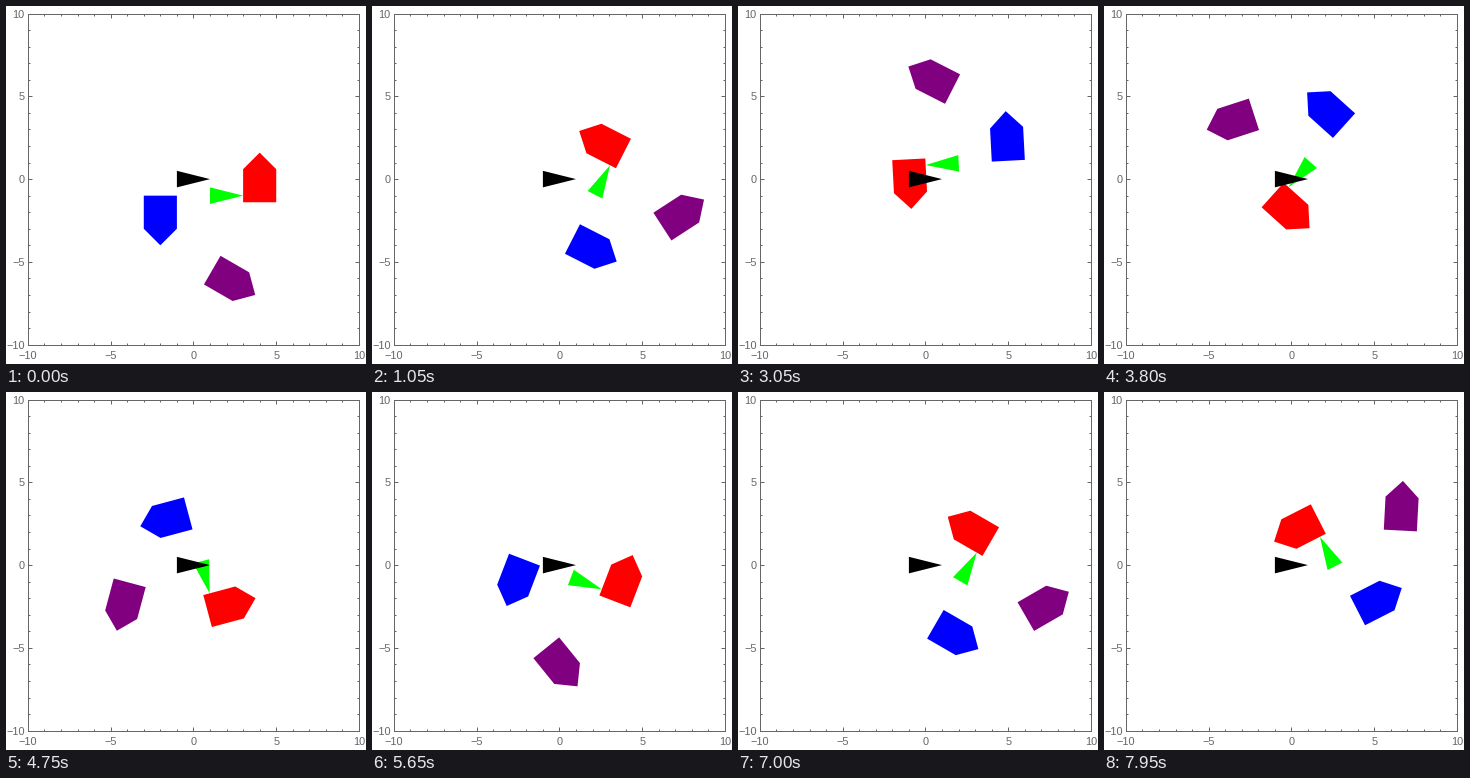
Animation of 360 by 358 pixels, one loop 8 s. Source, as a matplotlib script:

```python
import matplotlib.pyplot as plt
import numpy as np
from matplotlib.animation import FuncAnimation
from matplotlib.patches import Polygon
from matplotlib.ticker import MultipleLocator

W, H, DPI = 360, 358, 64
PX = 72 / DPI  # points per pixel
FRAMES, INTERVAL = 160, 50
STEP = 3  # degrees per frame
PIVOT = np.array([1.53, -0.037])
GRAY = "#666666"

plt.rcParams["font.family"] = "Liberation Sans"

# Both outlines point along +x
HOUSE = np.array([(-1, -1), (1, -1), (2, 0), (1, 1), (-1, 1)])
DART = np.array([(-1, -0.5), (1, 0), (-1, 0.5)])


def rotate(points, degrees):
    a = np.radians(degrees)
    c, s = np.cos(a), np.sin(a)
    return points @ np.array([(c, s), (-s, c)])


def place(outline, center, heading):
    return rotate(outline, heading) + center


MOVERS = [
    ("#ff0000", place(HOUSE, (4, -0.4), 90)),
    ("#0000ff", place(HOUSE, (-2, -2), -90)),
    ("#800080", place(HOUSE, (2, -6), -30)),
    ("#00ff00", place(DART, (2, -1), 0)),
]

fig = plt.figure(figsize=(W / DPI, H / DPI), dpi=DPI, facecolor="white")
left, right, top, bottom = 21.9, 353.0, 7.6, 338.6
ax = fig.add_axes([left / W, 1 - bottom / H, (right - left) / W, (bottom - top) / H])
ax.set(xlim=(-10, 10), ylim=(-10, 10))

for axis in (ax.xaxis, ax.yaxis):
    axis.set_major_locator(MultipleLocator(5))
    axis.set_minor_locator(MultipleLocator(1))
ax.tick_params(which="both", direction="in", top=True, right=True,
               color=GRAY, width=PX)
ax.tick_params(which="major", length=4 * PX, labelsize=11 * PX,
               labelcolor=GRAY, pad=3 * PX)
ax.tick_params(which="minor", length=2 * PX)
ax.tick_params(axis="x", which="major", pad=6 * PX)
for spine in ax.spines.values():
    spine.set(color=GRAY, linewidth=PX)


def add_shape(points, color, z):
    shape = Polygon(points, closed=True, facecolor=color, linewidth=0,
                    zorder=z, snap=False)
    return ax.add_patch(shape)


shapes = [add_shape(points, color, 1) for color, points in MOVERS]
add_shape(DART, "black", 2)


def update(frame):
    for shape, (_, points) in zip(shapes, MOVERS):
        shape.set_xy(rotate(points - PIVOT, STEP * frame) + PIVOT)
    return shapes


anim = FuncAnimation(fig, update, frames=FRAMES, interval=INTERVAL,
                     repeat=True, repeat_delay=0, blit=False)
plt.show()
```
